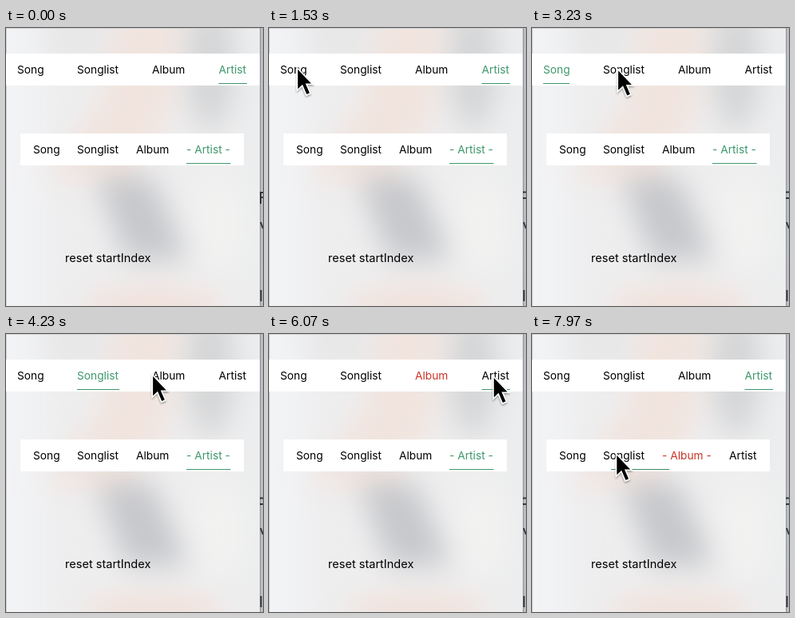
Write an HTML page that moves like this. It is 322 by 348 pixels and loops after 8000 ms.

```html
<!DOCTYPE html>
<html lang="en">
<head>
<meta charset="utf-8">
<title>Tab bars</title>
<style>
html, body { margin: 0; width: 100%; height: 100%; overflow: hidden; }
svg { display: block; width: 322px; height: 348px; font: 13.75px Inter, "Open Sans", sans-serif; }
</style>
</head>
<body>
<svg viewBox="0 0 322 348">
  <defs>
    <filter id="blur" x="-60%" y="-60%" width="220%" height="220%"><feGaussianBlur stdDeviation="18"/></filter>
    <filter id="shade" x="-50%" y="-50%" width="200%" height="200%"><feDropShadow dx="0" dy="1.5" stdDeviation="1.2" flood-opacity=".4"/></filter>
  </defs>
  <rect width="322" height="348" fill="#eeeeef"/>
  <g filter="url(#blur)">
    <rect x="-40" y="-40" width="85" height="440" fill="#f2f3f5"/>
    <ellipse cx="85" cy="10" rx="45" ry="35" fill="#e7e7e8"/>
    <path d="M140 -30H220L205 115L150 190H45L120 90Z" fill="#f1e4de"/>
    <ellipse cx="256" cy="45" rx="30" ry="85" fill="#d3d4d5"/>
    <path d="M112 185H182L230 290H150Z" fill="#c6c7cb"/>
    <ellipse cx="185" cy="348" rx="90" ry="20" fill="#f2dfd7"/>
    <rect x="295" y="-20" width="50" height="400" fill="#ecedee"/>
    <ellipse cx="268" cy="245" rx="35" ry="60" fill="#f2f2f1"/>
  </g>
  <path d="M0 .5H318M.5 0V348" stroke="#d2d2d4" fill="none"/>
  <rect x="318" width="4" height="348" fill="#babdc1"/>
  <path d="M318.5 0V348" stroke="#8e9296"/>
  <path id="edge" fill="none" stroke="#33363a" stroke-width="2"/>
  <rect y="32" width="318" height="40" fill="#fff"/>
  <rect x="18" y="132" width="280" height="40" fill="#fff"/>
  <g id="tabs"></g>
  <text x="74" y="293" font-size="14.55">reset startIndex</text>
  <path id="cursor" d="M0 0V28L6.4 22L11.5 34L16.6 31.8L11.6 20.2H19.4Z" stroke="#fff" stroke-width="1.6" filter="url(#shade)"/>
</svg>
<script>
const LOOP = 8000, SLIDE = 300, DASHES = 21;
const GREEN = [62, 152, 108], DARK = [62, 62, 62], RED = "#cb3529";
const names = ["Song", "Songlist", "Album", "Artist"];
const widths = [33, 53, 41.5, 35.5];

// Each move is [start time, tab index]; labels follow once the line has arrived.
const bars = [
  { y: 32, xs: [14, 89, 183, 266.5], dash: 0, moves: [[2300, 0], [3560, 1], [4480, 2], [5780, 3]] },
  { y: 132, xs: [34, 89, 163, 226], dash: DASHES, moves: [[7130, 2], [7767, 1]] }
];

// Pointer stops: time, x, y
const stops = [
  [30, 324, 110], [830, 33, 48], [1200, 35.3, 50], [3030, 35.3, 50], [3200, 107.3, 51.5],
  [3920, 107.3, 51.5], [4200, 183.3, 51], [4740, 183.3, 51], [5000, 257.3, 50.5], [5430, 257.3, 50.5],
  [5570, 281, 53], [6130, 281, 53], [6620, 183, 151], [7260, 183, 151], [7600, 105.5, 150]
];

const $ = id => document.getElementById(id);
const clamp = v => Math.max(0, Math.min(1, v));
const mix = (a, b, p) => a + (b - a) * p;
const smooth = p => p * p * (3 - 2 * p);
const cubic = p => p < .5 ? 4 * p ** 3 : 1 - 4 * (1 - p) ** 3;
const lineColor = i => i === 2 ? DARK : GREEN;

function add(tag, attrs) {
  const el = document.createElementNS("http://www.w3.org/2000/svg", tag);
  set(el, attrs);
  return $("tabs").appendChild(el);
}

function set(el, attrs) {
  for (const key in attrs) el.setAttribute(key, attrs[key]);
}

for (const bar of bars) {
  bar.labels = names.map(() => add("text", { y: bar.y + 25 }));
  bar.line = add("rect", { y: bar.y + 37, height: 1 });
}

const tabX = (bar, i, active) => bar.xs[i] + (active < i ? bar.dash : 0);

function drawBar(bar, t) {
  let active = 3, from = 3, to = 3, p = 1;
  for (const [start, tab] of bar.moves) {
    if (t < start) break;
    from = to;
    to = tab;
    p = clamp((t - start) / SLIDE);
    active = p < 1 ? from : to;
  }
  p = cubic(p);
  bar.labels.forEach((label, i) => {
    const on = i === active;
    label.textContent = on && bar.dash ? `- ${names[i]} -` : names[i];
    set(label, { x: tabX(bar, i, active), fill: !on ? "#000" : i === 2 ? RED : `rgb(${GREEN})` });
  });
  const a = lineColor(from), b = lineColor(to);
  set(bar.line, {
    x: mix(tabX(bar, from, from), tabX(bar, to, to), p),
    width: widths[to] + (bar.dash && bar.dash - 1),
    fill: `rgb(${a.map((c, i) => Math.round(mix(c, b[i], p)))})`
  });
}

function drawCursor(t) {
  let [, x, y] = stops[0];
  for (let i = 1; i < stops.length; i++) {
    const [t0, x0, y0] = stops[i - 1], [t1, x1, y1] = stops[i];
    if (t < t0) break;
    const p = smooth(clamp((t - t0) / (t1 - t0)));
    x = mix(x0, x1, p);
    y = mix(y0, y1, p);
  }
  set($("cursor"), { transform: `translate(${x} ${y})`, visibility: t < 30 ? "hidden" : "visible" });
}

function draw(now) {
  const t = now % LOOP;
  for (const bar of bars) drawBar(bar, t);
  drawCursor(t);
  const top = t < 30 ? "M319 205V220M318 206H322M318 212H322" : "M318 205.5H322M318 213H322";
  set($("edge"), { d: top + "M319 243L322 251M319.5 328V342" });
}

let begin;
function tick(now) {
  begin ??= now;
  draw(now - begin);
  requestAnimationFrame(tick);
}
draw(0);
requestAnimationFrame(tick);
</script>
</body>
</html>
```
